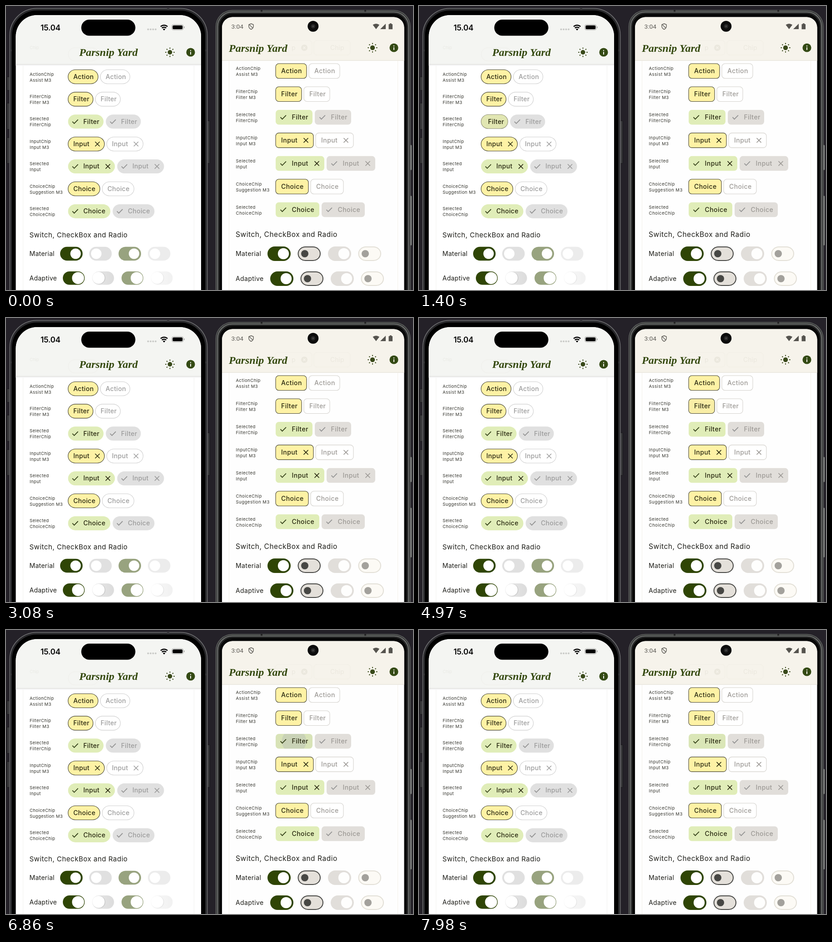
An HTML page that plays this animation: 895 by 626 pixels, repeating every 8 s.

```html
<!DOCTYPE html>
<html lang="en">
<head>
<meta charset="utf-8">
<title>Chips and switches</title>
<style>
html, body { margin: 0; width: 100%; height: 100%; overflow: hidden; background: #242128; }
svg { display: block; width: 100%; height: 100%; font-family: Inter, "Open Sans", sans-serif; }
.brand { font: italic bold 24px "Liberation Serif", serif; fill: #33480e; }
</style>
</head>
<body>
<svg id="stage" viewBox="0 0 895 626"></svg>
<script>
const LOOP = 8000, STEP = 70;
const YELLOW = [254, 242, 165], GREEN = [224, 237, 184];
const stage = document.getElementById('stage');

function el(tag, attrs, parent = stage) {
  const e = document.createElementNS('http://www.w3.org/2000/svg', tag);
  set(e, attrs);
  parent.appendChild(e);
  return e;
}
function set(e, attrs) {
  for (const k in attrs) e.setAttribute(k, attrs[k]);
}
const rect = (x, y, width, height, rx, fill, more, p) =>
  el('rect', { x, y, width, height, rx, fill, ...more }, p);
const circle = (cx, cy, r, fill, p) => el('circle', { cx, cy, r, fill }, p);
const path = (d, attrs, p) => el('path', { d, fill: 'none', ...attrs }, p);
function text(str, x, y, size, fill, more, p) {
  const e = el('text', { x, y, 'font-size': size, fill, ...more }, p);
  e.textContent = str;
  return e;
}
const rgb = c => `rgb(${c.map(Math.round)})`;
const mix = (a, b, k) => a.map((v, i) => v + (b[i] - v) * k);
const clamp = v => Math.max(0, Math.min(1, v));
function ease(t, start, length) {
  const u = clamp((t - start) / length);
  return u * u * (3 - 2 * u);
}

const IOS = {
  left: 136, top: 156, pitch: 49.4, h: 32, r: 16, label: 52, second: 10.5, pad: 12, checkPad: 34,
  mark: 16, spacing: .3, small: .4, grey: '#e0e0e0', line: '#cfcfcf', off: '#9b9b9b',
  widths: [[67, 66], [56, 56], [79, 78], [81, 81], [104, 104], [71, 71], [94, 93]]
};
const DROID = {
  left: 592.5, top: 143.3, pitch: 50.95, h: 33.5, r: 7, label: 505.5, second: 11, pad: 12.5, checkPad: 36,
  mark: 17, spacing: .45, small: .5, grey: '#e1deda', line: '#d3d1cc', off: '#9c9995',
  widths: [[69, 69], [58, 58], [82, 81], [84, 84], [108, 108], [73, 73], [97, 96]]
};
const ROWS = [
  ['ActionChip', 'Assist M3', 'Action'],
  ['FilterChip', 'Filter M3', 'Filter'],
  ['Selected', 'FilterChip', 'Filter', 1],
  ['InputChip', 'Input M3', 'Input', 0, 1],
  ['Selected', 'Input', 'Input', 1, 1],
  ['ChoiceChip', 'Suggestion M3', 'Choice'],
  ['Selected', 'ChoiceChip', 'Choice', 1]
];
let clipCount = 0;

function chip(o, x, cy, w, str, selected, closable, enabled) {
  const g = el('g', { transform: `translate(${x} ${cy})` });
  const ink = enabled ? '#27270f' : o.off;
  const fill = enabled ? rgb(selected ? GREEN : YELLOW) : selected ? o.grey : '#fff';
  const box = { x: .5, y: -o.h / 2 + .5, width: w - 1, height: o.h - 1, rx: o.r };
  const body = el('rect', { ...box, fill }, g);
  const id = 'clip' + clipCount++;
  const clip = el('rect', box, el('clipPath', { id }, g));
  const press = el('g', { 'clip-path': `url(#${id})` }, g);
  const wash = rect(0, -20, 120, 40, 0, '#a0a1b2', { opacity: 0 }, press);
  const splash = circle(w / 2, 0, 0, '#a0a1b2', press);
  const border = el('rect', { ...box, fill: 'none', stroke: enabled ? '#454432' : o.line,
    'stroke-width': 1.1, opacity: selected ? 0 : 1 }, g);
  const m = o.mark;
  const check = path(`M${m - 6} 0l4 4.2 8.4-8.6`,
    { stroke: enabled ? '#344018' : '#929292', 'stroke-width': 1.8, opacity: selected ? 1 : 0 }, g);
  const word = text(str, selected ? o.checkPad : o.pad, 4.8, 14, ink,
    { 'font-weight': 500, 'letter-spacing': o.spacing }, g);
  if (closable) path(`M${w - m - 5} -5l10 10m0-10l-10 10`, { stroke: ink, 'stroke-width': 1.5 }, g);
  return { g, x, cy, body, clip, wash, splash, border, check, word };
}

function chipTable(o) {
  return ROWS.map(([a, b, str, sel, close], i) => {
    const cy = o.top + o.pitch * i, [w1, w2] = o.widths[i];
    const more = { 'letter-spacing': o.small };
    text(a, o.label, cy - 2.5, 9.5, '#33332c', more);
    text(b, o.label, cy + o.second, 9.5, '#33332c', more);
    return [
      chip(o, o.left, cy, w1, str, sel, close, true),
      chip(o, o.left + w1 + 4, cy, w2, str, sel, close, false)
    ];
  });
}

function toggle(x, cy, w, h, fill, knobX, r, knob = '#fff', stroke = 'none') {
  const inset = stroke === 'none' ? 0 : 1;
  rect(x + inset, cy - h / 2 + inset, w - 2 * inset, h - 2 * inset, h / 2, fill, { stroke, 'stroke-width': 2 });
  circle(x + knobX, cy, r, knob);
}

function sun(x, y, r) {
  circle(x, y, r, '#39491a');
  for (let i = 0; i < 8; i++) {
    const a = i * Math.PI / 4, c = Math.cos(a), s = Math.sin(a);
    path(`M${x + c * (r + 2.8)} ${y + s * (r + 2.8)}L${x + c * (r + 5.4)} ${y + s * (r + 5.4)}`,
      { stroke: '#39491a', 'stroke-width': 2 });
  }
}
function info(x, y, bg) {
  circle(x, y, 9.6, '#344a14');
  rect(x - 1, y - 5, 2, 2.2, 0, bg);
  rect(x - 1, y - 1, 2, 6, 0, bg);
}

function gradient(id, stops) {
  const g = el('linearGradient', { id });
  stops.forEach((c, i) => el('stop', { offset: i / (stops.length - 1), 'stop-color': c }, g));
}

function drawPhone() {
  [[2, 156, 30], [2, 214, 58], [2, 290, 57], [442, 253, 94]].forEach(([x, y, h]) =>
    rect(x, y, 6, h, 1.5, '#3b3b3d', { stroke: '#151517' }));
  rect(8.5, 5.5, 434, 720, 59, '#050506', { stroke: '#68686b', 'stroke-width': 2 });
  rect(11.5, 8.5, 428, 715, 56, '#000', { stroke: '#29292c', 'stroke-width': 3 });
  rect(9, 96, 4, 4, 0, '#333336');
  rect(438, 96, 4, 4, 0, '#333336');
  rect(354, 5, 5, 4, 0, '#333336');
  rect(21.5, 20, 407.5, 680, 47, '#fff');
  path('M37.5 130V626M413.5 130V626', { stroke: '#f1f1ef' });
  path('M21.5 129V67a47 47 0 0 1 47-47H382a47 47 0 0 1 47 47V129Z', { fill: '#f4f5f2' });
  rect(21.5, 128, 407.5, 1.5, 0, '#dededc');
  rect(21.5, 129.5, 407.5, 2, 0, '#f4f4f4');
  rect(137, 92, 66, 29, 14, 'none', { stroke: '#efefeb' });
  text('Chip', 52, 95, 9.5, '#e9eae5');
  text('15.04', 76, 53.5, 17, '#000', { 'font-weight': 600, 'letter-spacing': -.2 });
  rect(165.5, 30, 119, 35.5, 17.75, '#000');
  [312.5, 318, 323.5, 329].forEach(x => circle(x, 51.5, 2, '#c9cac7'));
  path('M340 45.2q7.6-6 15.2 0M342.8 48.6q4.8-3.8 9.6 0', { stroke: '#000', 'stroke-width': 2.5 });
  path('M347.6 54l-2.8-2.9q2.8-2 5.6 0Z', { fill: '#000' });
  rect(364.5, 41, 25.5, 12, 4, 'none', { stroke: '#a5a5a3' });
  rect(366.3, 42.8, 22, 8.4, 2.5, '#000');
  rect(391.2, 45, 1.5, 4, .8, '#a5a5a3');
  el('text', { class: 'brand', x: 161, y: 110 }).textContent = 'Parsnip Yard';
  sun(360.5, 102, 5);
  info(406, 102, '#f4f5f2');
}

function drawDroid() {
  rect(888, 306, 4.5, 56, 2, '#858786', { stroke: '#303131' });
  rect(888, 418, 4.5, 110, 2, '#858786', { stroke: '#303131' });
  rect(461.5, 9.5, 427.5, 720, 36, '#3c3e3d', { stroke: '#5c5e5d', 'stroke-width': 1.5 });
  rect(465.5, 13.5, 419.5, 715, 32, '#0c0c0c', { stroke: '#848685', 'stroke-width': 1.5 });
  rect(468, 16, 414.5, 715, 30, '#080808', { stroke: '#2c2d2d', 'stroke-width': 2 });
  rect(560, 9, 4, 4, 0, '#242424');
  rect(788, 9, 4, 4, 0, '#242424');
  rect(475, 24.5, 400.5, 680, 23, '#fefefe');
  path('M490.5 121V626M861.5 121V626', { stroke: '#f3f1ea' });
  path('M475 120V47.5a23 23 0 0 1 23-23H852.5a23 23 0 0 1 23 23V120Z', { fill: '#f6f3eb' });
  rect(475, 119.5, 400.5, 1.2, 0, '#e6e2d8');
  rect(592, 76, 81, 32, 7, 'none', { stroke: '#f1eee5' });
  rect(677, 76, 80, 32, 7, 'none', { stroke: '#f1eee5' });
  text('p', 628, 97, 14, '#ebe8de');
  circle(656, 92, 7, '#ebe8de');
  path('M653.5 89.5l5 5m0-5l-5 5', { stroke: '#f6f3eb', 'stroke-width': 1.5 });
  text('Chip', 713, 97, 14, '#ebe8de');
  text('3:04', 495.5, 49.5, 13.7, '#5c5a55', { 'font-family': 'Roboto, sans-serif' });
  path('M539 39l5 2v4q0 4-5 6.5q-5-2.5-5-6.5v-4ZM535.5 41.5l7 7', { stroke: '#5c5a55', 'stroke-width': 1.4 });
  circle(675.3, 44.7, 12, '#0c0c0c');
  circle(675.3, 44.7, 5, '#252525');
  circle(675.3, 44.7, 2, '#454545');
  path('M806.5 41.5q7.3-5 14.6 0L813.8 51Z', { fill: '#55534e' });
  path('M835 39v12h-12Z', { fill: '#55534e' });
  path('M841.5 40h2.3v-1.7h4v1.7h2.2v11.3h-8.5Z', { fill: '#55534e' });
  el('text', { class: 'brand', x: 490, y: 101 }).textContent = 'Parsnip Yard';
  sun(806, 92, 5.2);
  info(853, 92, '#f6f3eb');
}

function drawSwitches() {
  const ink = '#1d1d18';
  text('Switch, CheckBox and Radio', 51.5, 510, 15, ink, { 'letter-spacing': .5 });
  text('Switch, CheckBox and Radio', 505, 508.5, 15.4, ink, { 'letter-spacing': .6 });
  [['Material', 551], ['Adaptive', 605]].forEach(([s, y], i) => {
    text(s, 51.5, y, 14, ink, { 'letter-spacing': .25 });
    text(s, 505, y + i, 14, ink, { 'letter-spacing': .4 });
  });
  gradient('fade', ['#f0f0f0', '#e2e2e2', '#dcdcdc']);
  gradient('pale', ['#fafafa', '#f5f5f5', '#f1f1f1']);
  const dark = '#2f4505', sage = '#98a37f';
  toggle(119, 546, 49.5, 30.5, dark, 34, 11.5);
  toggle(183, 546, 49.5, 30.5, '#e0e0e0', 15.5, 11.5);
  toggle(247.5, 546, 49.5, 30.5, sage, 34, 11.5);
  toggle(312, 546, 49.5, 30.5, '#ececec', 15.5, 11.5);
  toggle(125, 599.7, 48, 29.5, dark, 33.5, 13.3);
  toggle(189.5, 599.7, 48, 29.5, 'url(#fade)', 15, 14, '#cdcdcd');
  circle(203.5, 599.2, 13.3, '#fff');
  toggle(254, 599.7, 48, 29.5, sage, 33.5, 13.3);
  toggle(318.5, 599.7, 48, 29.5, 'url(#pale)', 15, 14, '#e8e8e8');
  circle(332.5, 599.2, 13.3, '#fff');
  [[575, 546], [581, 601]].forEach(([x, cy]) => {
    toggle(x, cy, 51, 32, dark, 35, 12.2);
    toggle(x + 66.5, cy, 50.5, 32, '#e4e0da', 15.5, 8, '#474744', '#474744');
    toggle(x + 133, cy, 51, 32, '#e1deda', 35, 12.2, '#fefefd');
    toggle(x + 199.5, cy, 50.5, 32, '#fcfaf5', 15.5, 8, '#a3a19c', '#e2dfd6');
  });
}

// tint: 1 = green, 0 = yellow; open: 1 = room for the check mark
function poseFilter(o, [main, side], tint, open) {
  const narrow = o.widths[1][0], wide = o.widths[2][0];
  const w = narrow + (wide - narrow) * open;
  set(main.body, { width: w - 1, fill: rgb(mix(YELLOW, GREEN, tint)) });
  set(main.clip, { width: w - 1 });
  set(main.border, { width: w - 1, opacity: Math.sqrt(1 - clamp(tint)) });
  set(main.check, { opacity: clamp(open * 2 - 1) });
  set(main.word, { x: o.pad + (o.checkPad - o.pad) * open });
  set(side.g, { transform: `translate(${side.x + w - wide} ${side.cy})` });
}

function pressure(dt) {
  if (dt < 0 || dt > 770) return 0;
  return clamp((dt + 35) / 140) * (1 - clamp((dt - 230) / 540)) ** 2;
}
function ripple(c, t, starts, speed, wash) {
  const start = starts.filter(s => t >= s).pop();
  const dt = start === undefined ? -1 : t - start, k = pressure(dt);
  set(c.wash, { opacity: wash * k });
  set(c.splash, { r: k ? Math.min(90, 8 + dt * speed + Math.max(0, dt - 210) * .4) : 0, opacity: .27 * k });
}
function pulse(t, start, length) {
  const u = (t - start + 35) / (length + 70);
  return u > 0 && u < 1 ? Math.sin(Math.PI * u) : 0;
}

drawPhone();
drawDroid();
drawSwitches();
const ios = chipTable(IOS), droid = chipTable(DROID);

function draw(t) {
  poseFilter(IOS, ios[2],
    1 - ease(t, 350, 260) + ease(t, 1260, 220),
    1 - ease(t, 400, 260) + ease(t, 1340, 230));
  set(ios[2][0].wash, { opacity: .12 * (pulse(t, 350, 350) + pulse(t, 1260, 350)) });
  set(ios[1][0].wash, { opacity: .3 * (pulse(t, 2310, 350) + pulse(t, 2800, 245)) });

  const swap = 1 - ease(t, 6880, 210) + ease(t, 7730, 210);
  poseFilter(DROID, droid[2], swap, swap);
  ripple(droid[1][0], t, [4970, 5810], .36, .2);
  ripple(droid[2][0], t, [6650, 7490], .09, .13);
}

function tick(now) {
  const t = now % LOOP;
  draw(Math.floor(t / STEP) * STEP);
  requestAnimationFrame(tick);
}
draw(0);
requestAnimationFrame(tick);
</script>
</body>
</html>
```
